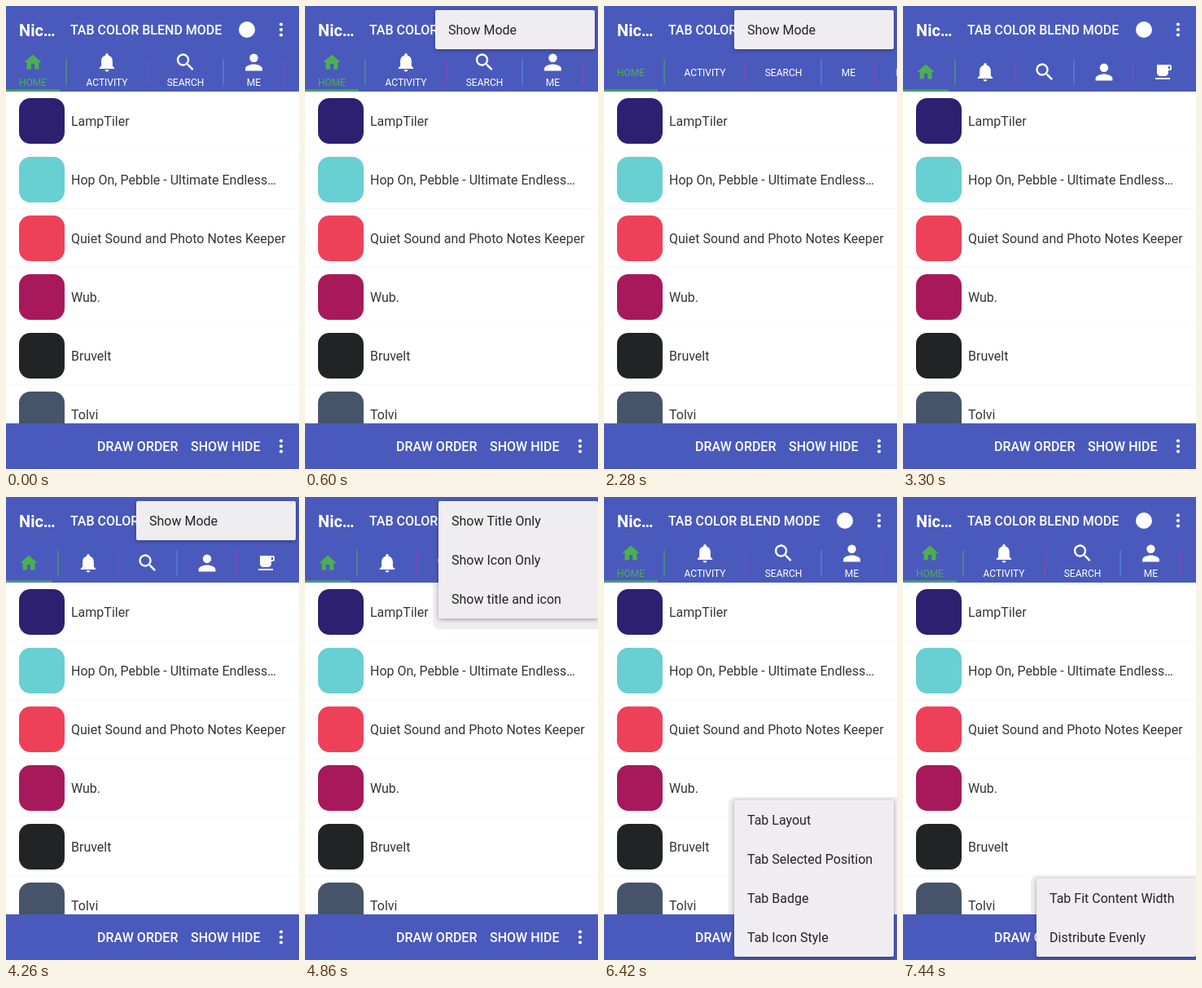
Recreate the animation shown at these times as an HTML page with a canvas. Size 360 by 568 pixels, loop 8 s.

```html
<!DOCTYPE html>
<html lang="en">
<head>
<meta charset="utf-8">
<title>Tab layout demo</title>
<style>
  html, body { margin: 0; width: 100%; height: 100%; overflow: hidden; background: #fff; }
  canvas { display: block; width: 360px; height: 568px; }
</style>
</head>
<body>
<canvas id="stage"></canvas>
<script>
const W = 360, H = 568, LOOP = 8000;
const LIST_TOP = 105, LIST_END = 512;
const BLUE = '#4a5abc', GREEN = '#4caf50', MENU = '#efedf0';

const canvas = document.getElementById('stage');
const ctx = canvas.getContext('2d');
const dpr = window.devicePixelRatio || 1;
canvas.width = W * dpr;
canvas.height = H * dpr;

const icon = (d, scale) => ({ path: new Path2D(d), scale });
const HOME = icon('M10 20v-6h4v6h5v-8h3L12 3 2 12h3v8z', 1.06);
const BELL = icon('M12 22c1.1 0 2-.9 2-2h-4c0 1.1.89 2 2 2zm6-6v-5c0-3.07-1.64-5.64-4.5-6.32V4c0-.83-.67-1.5-1.5-1.5s-1.5.67-1.5 1.5v.68C7.63 5.36 6 7.92 6 11v5l-2 2v1h16v-1z', 1.15);
const FIND = icon('M15.5 14h-.79l-.28-.27A6.5 6.5 0 1 0 13.73 14.43l.27.28v.79l5 4.99L20.49 19zm-6 0a4.5 4.5 0 1 1 0-9 4.5 4.5 0 0 1 0 9z', 1.18);
const USER = icon('M12 12a4 4 0 1 0 0-8 4 4 0 0 0 0 8zm0 2c-2.67 0-8 1.34-8 4v2h16v-2c0-2.66-5.33-4-8-4z', 1.3);
const CAFE = icon('M20 3H4v10c0 2.21 1.79 4 4 4h6c2.21 0 4-1.79 4-4v-3h2c1.11 0 2-.89 2-2V5c0-1.11-.89-2-2-2zm0 5h-2V5h2zM2 21h18v-2H2z', 1);

const ICONS = [HOME, BELL, FIND, USER, CAFE];
const LABELS = ['HOME', 'ACTIVITY', 'SEARCH', 'ME', 'MORE'];
const LINES = ['#4caf50', '#8a47ae', '#5590e0', '#9a40b0'];

// Tab centres, divider places and indicator width for each mode
const BOTH = { tabs: [33, 124, 220.5, 304.5, 385], lines: [74, 174, 267, 341], bar: 66, iconY: 69, textY: 98 };
const TITLE = { tabs: [33, 124, 220.5, 300.5, 375], lines: [74, 173, 267, 333], bar: 66, textY: 86 };
const ICON = { tabs: [28, 101, 174, 247, 320], lines: [64, 137, 210, 283], bar: 56, iconY: 81 };

const modeAt = t => t < 1380 ? BOTH : t < 3120 ? TITLE : t < 4920 ? ICON : BOTH;

const ROWS = [
  ['LampTiler', '#2d2070'],
  ['Hop On, Pebble - Ultimate Endless…', '#68cfd2'],
  ['Quiet Sound and Photo Notes Keeper', '#ee4059'],
  ['Wub.', '#a8195c'],
  ['Bruvelt', '#222325'],
  ['Tolvi', '#465469']
];

const MODE = { x: 160, y: 5, w: 196, items: ['Show Mode'] };
const SHOW = { x: 164, y: 5, w: 196, items: ['Show Title Only', 'Show Icon Only', 'Show title and icon'] };
const MORE = { x: 160, y: 372, w: 196, up: true,
  items: ['Tab Layout', 'Tab Selected Position', 'Tab Badge', 'Tab Icon Style'] };
const FIT = { x: 164, y: 468, w: 196, up: true, items: ['Tab Fit Content Width', 'Distribute Evenly'] };

// menu, start of opening, start of closing
const POPUPS = [
  [MODE, 120, 640], [SHOW, 700, 1350],
  [MODE, 2040, 2440], [SHOW, 2500, 3090],
  [MODE, 3720, 4280], [SHOW, 4310, 4890],
  [MORE, 6060, 7120], [FIT, 7180, 9000]
];

const clamp = v => Math.max(0, Math.min(1, v));
const easeOut = v => 1 - (1 - clamp(v)) ** 3;

function rect(x, y, w, h, color) {
  ctx.fillStyle = color;
  ctx.fillRect(x, y, w, h);
}

function round(x, y, w, h, r, color) {
  ctx.fillStyle = color;
  ctx.beginPath();
  ctx.roundRect(x, y, w, h, r);
  ctx.fill();
}

function dot(x, y, r) {
  ctx.fillStyle = '#fff';
  ctx.beginPath();
  ctx.arc(x, y, r, 0, Math.PI * 2);
  ctx.fill();
}

function text(str, x, y, size, color, weight = 400, align = 'left') {
  ctx.font = `${weight} ${size}px Roboto, sans-serif`;
  ctx.textAlign = align;
  ctx.fillStyle = color;
  ctx.fillText(str, x, y);
}

function drawIcon({ path, scale }, x, y, color) {
  ctx.save();
  ctx.translate(x, y);
  ctx.scale(scale, scale);
  ctx.translate(-12, -12);
  ctx.fillStyle = color;
  ctx.fill(path, 'evenodd');
  ctx.restore();
}

function overflow(y) {
  for (const d of [-6.5, 0, 6.5]) dot(338, y + d, 2.1);
}

function drawList() {
  ROWS.forEach(([name, color], i) => {
    const y = 113 + i * 72;
    round(16, y, 56, 56, 14, color);
    text(name, 80, y + 34, 16, '#353535');
    rect(0, y + 63, W, 1, '#f8f8f8');
  });
}

function drawBars(mode) {
  rect(0, 0, W, LIST_TOP, BLUE);
  text('Nic…', 16, 37, 20, '#fff', 700);
  text('TAB COLOR BLEND MODE', 79, 35, 16, '#fff', 500);
  dot(296, 29, 10);
  overflow(29);

  mode.tabs.forEach((x, i) => {
    const color = i ? '#fff' : GREEN;
    if (mode.iconY) drawIcon(ICONS[i], x, mode.iconY, color);
    if (mode.textY) text(LABELS[i], x, mode.textY, 12, color, 400, 'center');
  });
  mode.lines.forEach((x, i) => rect(x - 0.5, 65, 1, 32, LINES[i]));
  rect(0, 102.5, mode.bar, 2, GREEN);

  rect(0, LIST_END, W, H - LIST_END, BLUE);
  text('DRAW ORDER', 112, 546, 16, '#fff', 500);
  text('SHOW HIDE', 227, 546, 16, '#fff', 500);
  overflow(540);
}

// Grows out of the corner next to the overflow button
function drawPopup({ x, y, w, items, up }, open, close, t) {
  const alpha = clamp((t - open) / 100) * (1 - clamp((t - close) / 150));
  if (alpha <= 0) return;
  const h = items.length * 48;
  const grow = easeOut((t - open) / 230);
  const cw = (w + 24) * grow, ch = (h + 24) * grow;

  ctx.save();
  ctx.globalAlpha = alpha;
  ctx.beginPath();
  ctx.rect(x + w + 8 - cw, up ? y + h + 8 - ch : y - 5, cw, ch);
  ctx.clip();

  ctx.save();
  ctx.beginPath();
  ctx.rect(0, LIST_TOP, W, LIST_END - LIST_TOP);
  ctx.clip();
  round(x - 7, y - 4, w + 20, h + 17, 8, '#eeecef');
  ctx.restore();

  ctx.save();
  ctx.shadowColor = 'rgba(0,0,0,.32)';
  ctx.shadowBlur = 5 * dpr;
  ctx.shadowOffsetY = 1.5 * dpr;
  round(x, y, w, h, 2, MENU);
  ctx.restore();

  items.forEach((s, i) => text(s, x + 16, y + 30 + i * 48, 16, '#252525'));
  ctx.restore();
}

function draw(t) {
  ctx.setTransform(dpr, 0, 0, dpr, 0, 0);
  rect(0, 0, W, H, '#fff');
  drawList();
  drawBars(modeAt(t));
  for (const [menu, open, close] of POPUPS) drawPopup(menu, open, close, t);
}

const start = performance.now();
function tick() {
  draw((performance.now() - start) % LOOP);
  requestAnimationFrame(tick);
}
tick();
</script>
</body>
</html>
```
